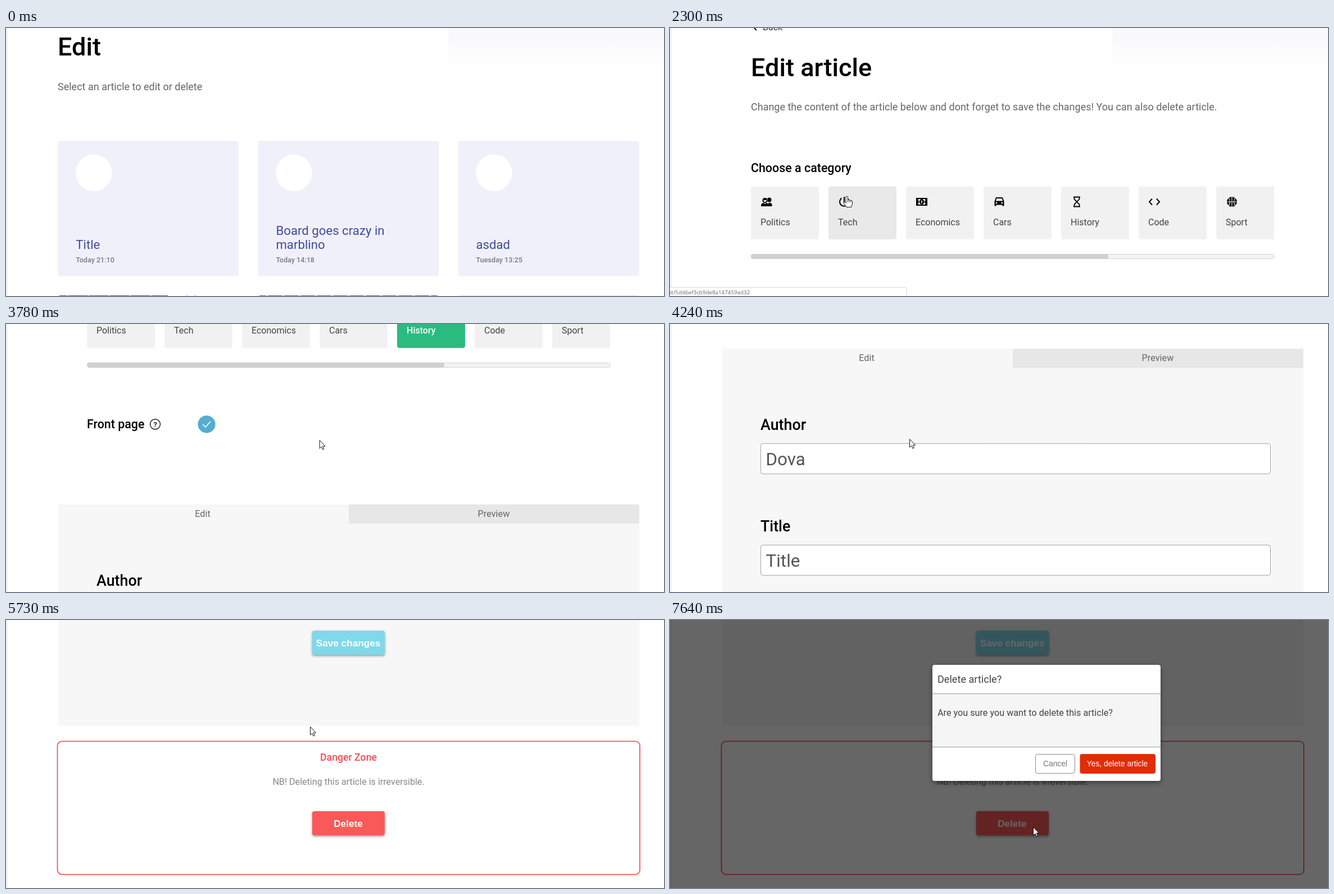
These frames come from a looping animation (1171x478 px, 8000 ms). An HTML page with a canvas:

```html
<!DOCTYPE html>
<html lang="en">
<head>
<meta charset="utf-8">
<title>Edit article</title>
<style>
html, body { margin: 0; width: 100%; height: 100%; overflow: hidden; background: #fff; }
canvas { display: block; }
</style>
</head>
<body>
<canvas id="stage" width="1171" height="478"></canvas>
<script>
const W = 1171, H = 478, LOOP = 8000;
const ctx = document.getElementById('stage').getContext('2d');
const SANS = 'Roboto, sans-serif', ARIAL = '"Liberation Sans", Arial, sans-serif';

// Keys are [time, value, value...]; values ease linearly between them.
function track(keys, t) {
  let i = 0;
  while (i < keys.length - 1 && keys[i + 1][0] <= t) i++;
  const a = keys[i], b = keys[i + 1] || a;
  const k = b === a ? 0 : Math.max(0, (t - a[0]) / (b[0] - a[0]));
  return a.slice(1).map((v, j) => v + (b[j + 1] - v) * k);
}
const ramp = (t, from, to) => Math.min(1, Math.max(0, (t - from) / (to - from)));
const mix = (a, b, k) => `rgb(${a.map((v, i) => Math.round(v + (b[i] - v) * k))})`;

const SCROLL = [[0, 0], [2390, 0], [2480, 50], [2600, 125], [2730, 161], [3460, 161], [3560, 200],
  [3980, 455], [4240, 611], [4810, 1045], [4850, 1055], [5060, 1194], [5250, 1430], [5320, 1474],
  [5520, 1474], [5570, 1530], [5680, 1728], [5730, 1754]];
const POINTER = [[0, 915, 500], [280, 915, 485], [420, 900, 390], [580, 770, 280], [760, 590, 225],
  [930, 440, 240], [1060, 345, 280], [1200, 320, 295], [1340, 315, 300], [2340, 315, 300],
  [2480, 400, 312], [2730, 615, 308], [2830, 616, 307], [2940, 665, 240], [3040, 697, 192],
  [3200, 698, 194], [3500, 698, 194], [3760, 570, 207], [3980, 440, 207], [4240, 426, 205],
  [4600, 440, 200], [4840, 478, 194], [5060, 502, 191], [5320, 541, 190], [6370, 541, 190],
  [6470, 528, 245], [6560, 540, 318], [6640, 562, 361], [6840, 562, 361], [6930, 600, 369],
  [7040, 646, 369]];

function text(s, x, y, size, color, weight = 400, font = SANS, align = 'left') {
  ctx.font = `${weight} ${size}px ${font}`;
  ctx.textAlign = align;
  ctx.fillStyle = color;
  ctx.fillText(s, x, y);
}
function rect(x, y, w, h, color) {
  ctx.fillStyle = color;
  ctx.fillRect(x, y, w, h);
}
function box(x, y, w, h, r, fill, stroke, line = 1) {
  ctx.beginPath();
  ctx.roundRect(x, y, w, h, r);
  if (fill) { ctx.fillStyle = fill; ctx.fill(); }
  if (stroke) { ctx.strokeStyle = stroke; ctx.lineWidth = line; ctx.stroke(); }
}
function disc(x, y, r, color, ry = r) {
  ctx.beginPath();
  ctx.ellipse(x, y, r, ry, 0, 0, 7);
  ctx.fillStyle = color;
  ctx.fill();
}
function strokePath(d, color, line) {
  ctx.strokeStyle = color;
  ctx.lineWidth = line;
  ctx.stroke(new Path2D(d));
}
function fillPath(d, color) {
  ctx.fillStyle = color;
  ctx.fill(new Path2D(d), 'evenodd');
}
function shadow(alpha, blur, dy) {
  ctx.shadowColor = `rgba(0,0,0,${alpha})`;
  ctx.shadowBlur = blur;
  ctx.shadowOffsetY = dy;
}
function shifted(x, y, draw) {
  ctx.save();
  ctx.translate(x, y);
  draw();
  ctx.restore();
}

function backdrop(scroll) {
  rect(0, 0, W, H, '#fff');
  const g = ctx.createLinearGradient(0, -scroll, 0, 72 - scroll);
  g.addColorStop(0, '#f8f8fb');
  g.addColorStop(1, '#fff');
  rect(787, -scroll, W - 787, 72, g);
  rect(1, 0, 1.5, H, '#ececee');
}

const CARDS = [
  [['Title'], 'Today 21:10'],
  [['Board goes crazy in', 'marblino'], 'Today 14:18'],
  [['asdad'], 'Tuesday 13:25']
];
function listPage(px, py, shown) {
  backdrop(0);
  text('Edit', 92, 49, 45, '#000', 500);
  text('Select an article to edit or delete', 92, 111, 18, '#666');
  CARDS.forEach(([lines, date], i) => {
    const x = 92.3 + i * 356.1;
    const hover = shown && px > x && px < x + 322 && py > 202 && py < 442;
    ctx.save();
    if (hover) shadow(.12, 8, 4);
    box(x, 201.5, 322, 241, 4, '#f0f0fa');
    ctx.restore();
    disc(x + 64, 258.3, 32.3, '#fff', 33);
    lines.forEach((s, n) => text(s, x + 32, 394 - 25 * (lines.length - 1 - n), 22.2, '#3f4b9b'));
    text(date, x + 32, 418, 12.6, '#7b7b88', 500);
  });
  rect(95, 477, 193, 1, '#55504f');
  for (let x = 108; x < 280; x += 37) rect(x, 477, 3, 1, '#aaa');
  rect(320, 477, 4, 1, '#ccc');
  rect(334, 477, 5, 1, '#ccc');
  rect(451, 477, 317, 1, '#5c5754');
  for (let x = 462; x < 760; x += 29) rect(x, 477, 5, 1, '#b5b0ad');
  rect(806, 477, 319, 1, '#ddd');
}

function statusBar(width) {
  box(-4, 462.5, width + 4, 20, [0, 3, 0, 0], '#fff', '#d8d8d8');
  ctx.save();
  ctx.beginPath();
  ctx.rect(0, 462, width - 4, 16);
  ctx.clip();
  text('it/5dd6ef3cb9de8a147459ad32', 0, 475, 9.8, '#666', 400, '"Open Sans", sans-serif');
  ctx.restore();
}

// Icons are centred on the origin.
const ICONS = {
  Politics(c) {
    disc(4.5, -3.5, 4, c);
    fillPath('M1 8H9.5V5Q9 1.5 4 1.5Z', c);
    disc(-3, -3, 5, '#f1f1f1');
    disc(-3, -3, 3.2, '#f1f1f1');
    ctx.beginPath();
    ctx.arc(-3, -2.5, 3.7, 0, 7);
    ctx.strokeStyle = c; ctx.lineWidth = 1.8; ctx.stroke();
    fillPath('M-6.6 -3Q-3 -2 .6 -4Q0 -7 -3 -7Q-6.5 -7 -6.6 -3Z', c);
    fillPath('M-10 8V6Q-9 2 -5 2L-3 4L-1 2Q3 2 4 6V8Z', c);
  },
  Tech(c) {
    strokePath('M0 -9V1M-4.7 -6.6A8 8 0 1 0 4.7 -6.6', c, 2);
  },
  Economics(c) {
    fillPath('M-10 -7H10V7H-10ZM-8 -3V3Q-6 3 -5.5 5H5.5Q6 3 8 3V-3Q6 -3 5.5 -5H-5.5Q-6 -3 -8 -3Z', c);
    disc(0, 0, 4.2, c, 5);
    rect(-.8, -2.5, 1.6, 5, '#f1f1f1');
    fillPath('M-8 -3Q-5 -3 -5 0T-8 3ZM8 -3Q5 -3 5 0T8 3Z', c);
  },
  Cars(c) {
    fillPath('M-8.5 -1L-6.3 -7Q-6 -8 -5 -8H5Q6 -8 6.3 -7L8.5 -1V7.5H5.5V5.5H-5.5V7.5H-8.5ZM-6.2 -1.5H6.2L4.7 -6H-4.7Z', c);
    disc(-5, 2, 1.4, '#f1f1f1');
    disc(5, 2, 1.4, '#f1f1f1');
  },
  History(c) {
    strokePath('M-6 -8.5H6M-6 8.5H6M-4.5 -8V-4.5L0 0L4.5 -4.5V-8M-4.5 8V4.5L0 0L4.5 4.5V8', c, 1.8);
  },
  Code(c) {
    strokePath('M-4 -5.5L-9 0L-4 5.5M4 -5.5L9 0L4 5.5', c, 2);
  },
  Sport(c) {
    disc(0, 0, 9, c);
    strokePath('M0 -9V9M-9 0H9M-6 -7Q-1 0 -6 7M6 -7Q1 0 6 7', '#f1f1f1', 1.2);
  }
};

function categories(t) {
  const picked = ramp(t, 3200, 3360);
  ctx.save();
  ctx.beginPath();
  ctx.rect(140, 270, 935, 120);
  ctx.clip();
  Object.keys(ICONS).forEach((name, i) => {
    const x = 144 + 138 * i, on = name === 'History' ? picked : 0;
    const hover = name === 'Tech' && t < 2400;
    box(x, 282.5, 121, 94.5, 4, hover ? '#e9e9e9' : mix([241, 241, 241], [43, 187, 127], on));
    shifted(x + 28, 310, () => ICONS[name](mix([0, 0, 0], [255, 255, 255], on)));
    text(name, x + 17, 351.5, 16, mix([68, 68, 68], [255, 255, 255], on), on > .5 ? 500 : 400);
  });
  ctx.restore();
  box(144.5, 403.5, 931, 8, 4, '#f3f3f3', '#d2d2d2');
  box(144, 403, 636, 9, 4, '#d0d0d0');
}

function intro(t) {
  strokePath('M154 -6L149 -1L154 4', '#000', 1.8);
  text('Back', 165, 4, 16, '#333');
  text('Edit article', 144, 85.5, 45, '#000', 500);
  text('Change the content of the article below and dont forget to save the changes! You can also delete article.',
    144, 147, 18, '#666');
  text('Choose a category', 144, 257, 21.4, '#000', 500);
  categories(t);
  text('Front page', 144, 520.5, 21.4, '#000', 500);
  ctx.beginPath();
  ctx.arc(265.5, 513, 9, 0, 7);
  ctx.strokeStyle = '#111';
  ctx.lineWidth = 1.4;
  ctx.stroke();
  text('?', 265.5, 518, 13.5, '#111', 500, SANS, 'center');
  disc(357, 513, 15.6, '#55adcf');
  strokePath('M350 513L355 518L364 508', '#fff', 1.6);
}

function field(y, value, size, color) {
  box(161.5, y + .5, 907, 54, 4, '#fff', '#a2a2a2');
  text(value, 170.5, y + 28 + size * .345, size, color);
}

function form() {
  rect(610, 45, 517, 34, '#e7e7e7');
  text('Edit', 350, 67, 16.3, '#666', 400, SANS, 'center');
  text('Preview', 868, 67, 16.3, '#666', 400, SANS, 'center');
  ['Author', 'Title', 'Image'].forEach((s, i) => text(s, 161, 190 + 181 * i, 26.8, '#000', 500));
  field(213.5, 'Dova', 31.4, '#555');
  field(394.5, 'Title', 31.4, '#555');
  field(576, 'Link to image', 18, '#d8d8d8');
  field(649, 'Image Description', 18, '#d8d8d8');
}

function content() {
  text('Content', 161, 222.5, 26.8, '#000', 500);
  box(161.5, 247, 915, 284, 4, '#fff', '#a2a2a2');
  text('Content', 170.5, 277, 22, '#555');
}

function button(y, label, color) {
  ctx.save();
  shadow(.4, 4, 2);
  box(545, y, 129, 43, 4, color);
  ctx.restore();
  text(label, 609, y + 28, 17.2, '#fff', 700, ARIAL, 'center');
}

function footer() {
  button(19, 'Save changes', '#80d8ea');
  box(91.5, 216.3, 1036.5, 237.5, 8, '#fff', '#f25a5a', 1.8);
  text('Danger Zone', 609.5, 251, 17.7, '#f25050', 500, SANS, 'center');
  text('NB! Deleting this article is irreversible.', 609.5, 294, 16.1, '#888', 400, SANS, 'center');
  button(341, 'Delete', '#fa5959');
}

function modal(k) {
  ctx.save();
  ctx.globalAlpha = k;
  rect(0, 0, W, H, 'rgba(0,0,0,.6)');
  ctx.save();
  shadow(.45, 9, 3);
  box(467, 80, 406, 207, 4, '#fff');
  ctx.restore();
  rect(467, 131, 406, 96, '#f5f5f5');
  rect(467, 131, 406, 1, '#999');
  rect(467, 226, 406, 1, '#999');
  text('Delete article?', 476, 112, 18.1, '#444');
  text('Are you sure you want to delete this article?', 476, 170.5, 16.2, '#444');
  box(650.5, 239.5, 70, 34, 4, '#fff', '#888');
  text('Cancel', 685.5, 261, 13.9, '#777', 400, ARIAL, 'center');
  box(729.5, 239, 134.5, 35, 4, '#e12c06');
  text('Yes, delete article', 796, 261, 13.8, '#fff', 400, ARIAL, 'center');
  ctx.restore();
}

function articlePage(t) {
  const [s] = track(SCROLL, t);
  backdrop(s);
  rect(93, 656 - s, 1034, 1287, '#f7f7f7');
  shifted(0, -s, () => intro(t));
  shifted(0, 611 - s, form);
  shifted(0, 1194 - s, content);
  shifted(0, 1754 - s, footer);
  const k = ramp(t, 7370, 7640);
  if (k) modal(k);
}

function pointer(x, y, hand) {
  shifted(x, y, () => {
    ctx.lineJoin = 'round';
    const d = hand
      ? 'M-2 1Q0 -1 1.5 1V7Q3 5.5 4.3 7Q6 6 7 8Q9 7 9.5 9.5V14L7.5 19.5H-1L-6 12.5Q-6.5 10 -4 10.5L-2 12.5Z'
      : 'M.5 .5V15L3.8 12L6 17L8.3 16L6.2 11H10.5Z';
    fillPath(d, '#fff');
    strokePath(d, '#111', 1);
    if (hand) strokePath('M1.5 7V11M4.3 7V11M7 8V11', '#111', .8);
  });
}

function draw(t) {
  const [x, y] = track(POINTER, t);
  const list = t < 1930;
  const onCard = t > 400 && [92, 448, 804].some(c => x > c && x < c + 322) && y < 442;
  if (list) listPage(x, y, t >= 280);
  else articlePage(t);
  if (list ? onCard : t < 2400) statusBar(148 + 273 * ramp(t, 1570, 1700));
  if (t >= 280) pointer(x, y, list ? onCard : t < 2400);
}

function frame(now) {
  draw(now % LOOP);
  requestAnimationFrame(frame);
}
requestAnimationFrame(frame);
</script>
</body>
</html>
```
